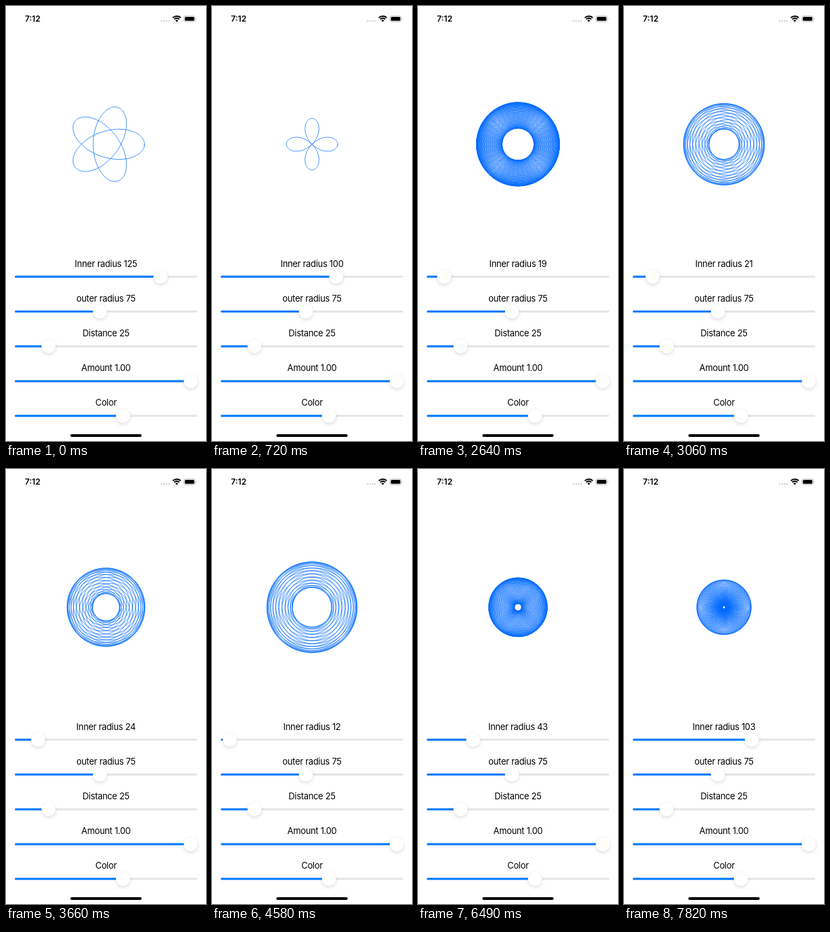
Recreate the animation shown at these times as an HTML page with a canvas. Size 296 by 640 pixels, loop 8000 ms.

```html
<!DOCTYPE html>
<html lang="en">
<head>
<meta charset="utf-8">
<title>Spirograph</title>
<style>
html, body { margin: 0; width: 100%; height: 100%; overflow: hidden; background: #fff; }
canvas, svg { position: absolute; left: 0; top: 0; width: 296px; height: 640px; }
text { font: 12.9px Inter, "Open Sans", sans-serif; letter-spacing: -.27px; text-anchor: middle; }
.clock { font-size: 12px; font-weight: 600; letter-spacing: 0; text-anchor: start; }
.track, .fill { stroke-width: 3; stroke-linecap: round; }
.track { stroke: #e5e5e6; }
.fill { stroke: #007aff; }
.thumb { fill: #fff; filter: drop-shadow(0 0 .5px rgba(0,0,0,.1)) drop-shadow(0 2.6px 2.6px rgba(0,0,0,.13)); }
</style>
</head>
<body>
<canvas id="art" width="296" height="640"></canvas>
<svg id="ui" viewBox="0 0 296 640">
  <text class="clock" x="28" y="23.2">7:12</text>
  <g fill="#c4c4c6">
    <circle cx="230.6" cy="22" r="1.1"/><circle cx="234.2" cy="22" r="1.1"/>
    <circle cx="237.8" cy="22" r="1.1"/><circle cx="241.3" cy="22" r="1.1"/>
  </g>
  <g fill="none" stroke="#000" stroke-width="1.9">
    <path d="M246.8 17.4a8.3 8.3 0 0 1 11.8 0"/>
    <path d="M248.9 19.6a5.3 5.3 0 0 1 7.6 0"/>
  </g>
  <path d="M252.7 23.5l-2.1-2.2a3 3 0 0 1 4.2 0z"/>
  <rect x="263.3" y="14.7" width="16.8" height="8.4" rx="2.6" fill="none" stroke="#a6a6a6" stroke-width=".8"/>
  <rect x="264.7" y="16.1" width="14" height="5.6" rx="1.5"/>
  <path d="M281.1 17.4q1.4 1.5 0 3z" fill="#a6a6a6"/>
  <rect x="95.2" y="630" width="105.6" height="3.9" rx="1.95"/>
</svg>
<script>
const LOOP = 8000, SCALE = 296 / 390, OUTER = 75, DISTANCE = 25;

// [ms, inner radius]
const steps = [
  [0, 125], [500, 124], [610, 115], [720, 100],
  [1330, 95], [1450, 84], [1570, 73], [1690, 62], [1810, 52], [1930, 44], [2040, 37],
  [2170, 26], [2320, 22], [2640, 19], [2760, 17], [2920, 18], [3060, 21],
  [3250, 23], [3375, 25], [3500, 26], [3660, 24], [3770, 22], [3890, 19],
  [4240, 17], [4410, 14], [4580, 12], [5070, 11], [5290, 10.6],
  [5850, 13], [5975, 19], [6100, 27], [6225, 35], [6350, 41], [6490, 43],
  [6760, 45], [6920, 52], [7060, 56], [7200, 62], [7310, 70], [7420, 81], [7530, 92],
  [7820, 103]
];

const ui = document.getElementById("ui");
const ctx = document.getElementById("art").getContext("2d");
const gcd = (a, b) => b ? gcd(b, a % b) : a;

function add(tag, attrs) {
  const el = document.createElementNS("http://www.w3.org/2000/svg", tag);
  for (const name in attrs) el.setAttribute(name, attrs[name]);
  return ui.appendChild(el);
}

function makeSlider(row) {
  const y = 398.3 + 51.2 * row;
  const line = { x1: 14.5, x2: 281.5, y1: y, y2: y };
  const label = add("text", { x: 148, y: y - 14.8 });
  add("line", { ...line, class: "track" });
  const fill = add("line", { ...line, class: "fill" });
  const thumb = add("circle", { class: "thumb", cy: y, r: 10.5 });
  return (text, part) => {
    const x = 22.6 + 250.9 * part;
    label.textContent = text;
    fill.setAttribute("x2", x);
    thumb.setAttribute("cx", x);
  };
}

const setInner = makeSlider(0);
makeSlider(1)("outer radius " + OUTER, (OUTER - 10) / 140);
makeSlider(2)("Distance " + DISTANCE, (DISTANCE - 1) / 149);
makeSlider(3)("Amount 1.00", 1);
makeSlider(4)("Color", 0.6);

function drawSpirograph(inner) {
  const diff = inner - OUTER, ratio = diff / OUTER;
  const end = Math.ceil(2 * Math.PI * OUTER / gcd(inner, OUTER));
  ctx.setTransform(1, 0, 0, 1, 0, 0);
  ctx.clearRect(0, 0, 296, 640);
  ctx.setTransform(SCALE, 0, 0, SCALE, 148, 203.4);
  ctx.beginPath();
  for (let a = 0; a <= end; a += 0.04) {
    ctx.lineTo(
      diff * Math.cos(a) + DISTANCE * Math.cos(ratio * a),
      diff * Math.sin(a) - DISTANCE * Math.sin(ratio * a)
    );
  }
  ctx.lineWidth = 1;
  ctx.strokeStyle = "#006cff";
  ctx.stroke();
}

let shown, drawn;
function frame() {
  const t = performance.now() % LOOP;
  const value = steps.findLast(step => step[0] <= t)[1];
  if (value !== shown) {
    const inner = Math.round(value);
    setInner("Inner radius " + inner, (value - 10) / 140);
    if (inner !== drawn) drawSpirograph(inner);
    shown = value;
    drawn = inner;
  }
  requestAnimationFrame(frame);
}
frame();
</script>
</body>
</html>
```
